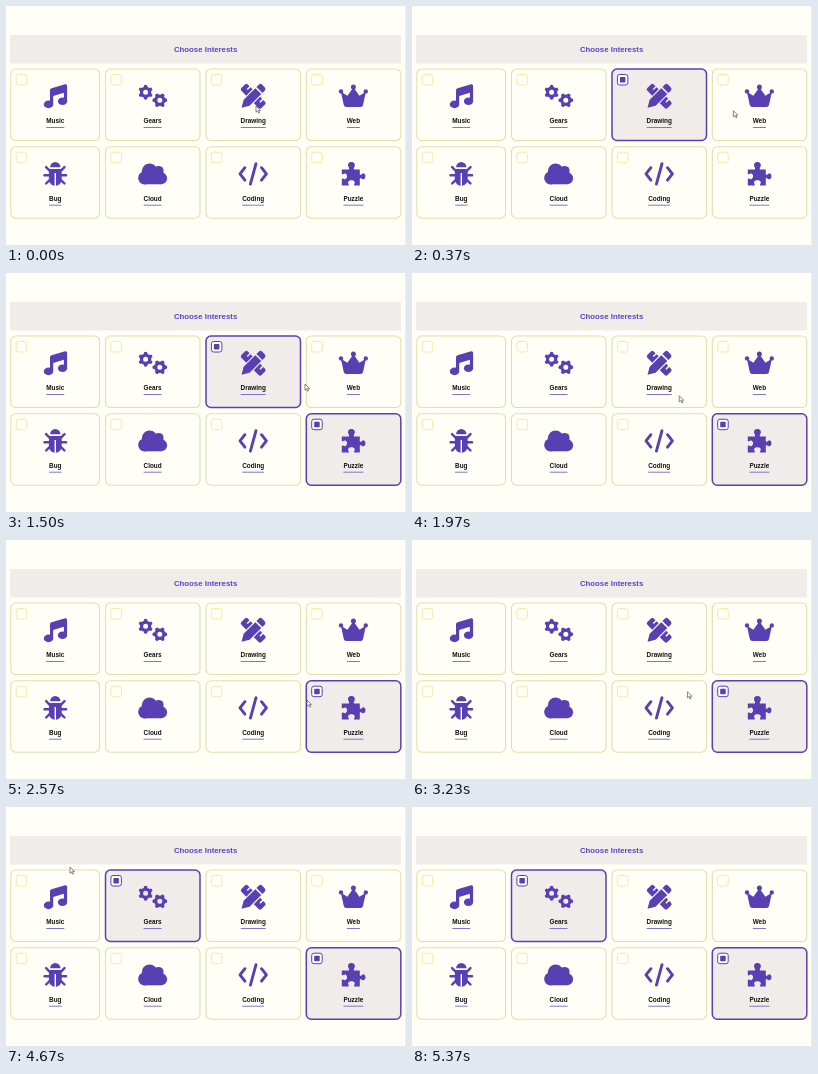
These frames come from a looping animation (400 px wide and 239 px high, 5400 ms). An HTML page:

```html
<!DOCTYPE html>
<html lang="en">
<head>
<meta charset="utf-8">
<title>Choose Interests</title>
<style>
  html, body { margin: 0; width: 100%; height: 100%; overflow: hidden; background: #fffff8; }
  svg { display: block; width: 100vw; height: 100vh; }
  text { font-family: "Liberation Sans", Arial, sans-serif; font-weight: bold; text-anchor: middle; }
  .icon { fill: #5840b4; stroke: none; }
  .line { fill: none; stroke: #5840b4; stroke-linecap: round; stroke-linejoin: round; }
</style>
</head>
<body>
<svg id="stage" viewBox="0 0 400 239">
  <rect width="400" height="239" fill="#fffff8"/>
  <rect x="399" width="1" height="239" fill="#f0eeec"/>
  <rect x="4" y="29" width="391" height="28.5" fill="#f0ecea"/>
  <text x="199.6" y="46" font-size="7.8" fill="#5b43c4">Choose Interests</text>
  <g id="cards"></g>
  <path id="cursor" d="M0 0V6.2L1.5 4.9 2.6 7.2 3.6 6.7 2.6 4.5H4.5Z" fill="#fff" stroke="#555" stroke-width=".7"/>
</svg>
<script>
const LOOP = 5400;
const FADE = 120;
const PURPLE = [88, 64, 180];
const CARD = { border: [226, 223, 172], check: [240, 237, 160], off: [255, 255, 248], on: [240, 236, 234] };

const shape = d => `<path class="icon" d="${d}"/>`;
const line = (d, width) => `<path class="line" stroke-width="${width}" d="${d}"/>`;
const ellipse = (x, y, rx, ry = rx) => `<ellipse class="icon" cx="${x}" cy="${y}" rx="${rx}" ry="${ry}"/>`;
const spin = (angle, body) => `<g transform="rotate(${angle})">${body}</g>`;

function gear(x, y, phase) {
  const teeth = [0, 1, 2, 3, 4, 5].map(i =>
    spin(phase + i * 60, shape("M4 -2.1L7 -1.5Q7.9 0 7 1.5L4 2.1Z"))).join("");
  return `<g transform="translate(${x} ${y})">
    <circle class="line" r="4.1" stroke-width="3.2"/>${teeth}</g>`;
}

const rulerHalf = shape("M-4.5 -5.3V-12.2Q-4.5 -14.2 -2.5 -14.2H2.5Q4.5 -14.2 4.5 -12.2V-9.7H.5V-8.2H4.5V-5.3Z");

const icons = {
  Music: shape("M-5.3 8V-6Q-5.3 -7.5 -3.8 -8L9.8 -12Q11.8 -12.3 11.8 -10.3V5H8.6V-3.4L-2.1 -.3V8Z")
    + ellipse(-6.8, 8.2, 4.7, 3.8) + ellipse(7.2, 5, 4.6, 3.8),
  Gears: gear(-7, -4, 30) + gear(7.2, 4, 0),
  Drawing: spin(-45, shape("M-16.5 0L-9.3 -4.2H7.2V4.2H-9.3ZM8.8 -4.2H12Q14.5 -4.2 14.5 -1.7V1.7Q14.5 4.2 12 4.2H8.8Z")
    + rulerHalf + `<g transform="scale(1 -1)">${rulerHalf}</g>`),
  Web: shape("M-12.5 -4.5L-6 -.5 0 -9 6 -.5 12.5 -4.5 9.7 8.6Q9.2 10.8 7.2 10.8H-7.2Q-9.2 10.8 -9.7 8.6Z")
    + ellipse(-12.4, -4.8, 2.2) + ellipse(0, -9.2, 2.5) + ellipse(12.4, -4.8, 2.2),
  Bug: shape("M-5.2 -6.6A5.2 5.2 0 0 1 5.2 -6.6ZM-6.4 -5H6.4V5.2C6.4 9 4 11.5 .7 11.8V-1H-.7V11.8C-4 11.5 -6.4 9 -6.4 5.2Z")
    + line("M-6 1.4H-10.8M6 1.4H10.8M-6 -3.6L-9.2 -6.8M6 -3.6L9.2 -6.8M-6 6.4L-9.2 9.6M6 6.4L9.2 9.6", 2.4),
  Cloud: ellipse(-8, 4, 6.5) + ellipse(8.5, 4.4, 6) + ellipse(-3, -2.7, 7.8) + ellipse(6, -3, 5)
    + shape("M-8 10.4H8.5V0H-8Z"),
  Coding: line("M-8.3 -6.2L-13.2 0 -8.3 6.2M8.3 -6.2L13.2 0 8.3 6.2M2.8 -10.2L-2.8 10.2", 2.9),
  Puzzle: shape(`M-11.6 -4.5H-5.3C-3.4 -4.5 -4.6 -6.5 -5.3 -8C-6.4 -13.3 2.4 -13.3 1.4 -8
    C.7 -6.5 -.5 -4.5 1.4 -4.5H6.4V.3C6.4 2 8 .2 9.4 -.5C13 -1 13 6 9.4 5.4C8 4.8 6.4 3 6.4 5V11.6
    H1.4C-.5 11.6 1.6 9.6 1.4 8.3C.8 5.8 -4.8 5.8 -5.3 8.3C-5.5 9.6 -3.4 11.6 -5.3 11.6H-11.6V5.4
    C-11.6 3.6 -9.8 5.5 -8.4 5.3C-5.6 4.6 -5.6 .1 -8.4 -.4C-9.8 -.6 -11.6 1.6 -11.6 -.2Z`)
};

// Times at which each card is toggled.
const clicks = { Drawing: [90, 1790], Web: [500, 1290], Puzzle: [1050], Gears: [4330] };

// Pointer path: time, x, y.
const path = [
  [0, 250, 100], [120, 251, 101], [500, 347, 106], [830, 333, 149], [1050, 343, 168],
  [1290, 341, 116], [1500, 299, 111], [1790, 250, 107], [2280, 306, 158], [2570, 301, 160],
  [2900, 279, 153], [3900, 265, 148], [4260, 152, 104], [4400, 148, 100], [4670, 64, 60], [5000, 37, -10]
];

const columns = [[4.8, 88.7], [99.5, 94.5], [200, 94.5], [300.3, 94.5]];
const centers = [49.3, 146.6, 247.2, 347.4];
const textWidths = { Music: 18, Gears: 18, Drawing: 25, Web: 13, Bug: 12.5, Cloud: 18, Coding: 22, Puzzle: 20 };

const cards = Object.keys(icons).map((name, i) => {
  const [x, width] = columns[i % 4];
  const center = centers[i % 4];
  const y = i < 4 ? 63 : 140.7;
  const half = textWidths[name] / 2;
  const group = document.createElementNS("http://www.w3.org/2000/svg", "g");
  group.innerHTML = `
    <rect class="frame" x="${x}" y="${y}" width="${width}" height="71.5" rx="5"/>
    <rect class="box" x="${x + 5.4}" y="${y + 5.5}" width="10.5" height="10.5" rx="2.2" fill="#fffffa"/>
    <rect class="mark" x="${x + 7.9}" y="${y + 8}" width="5.5" height="5.5" rx=".8" fill="#5840b4"/>
    <g transform="translate(${center} ${y + 27.2})">${icons[name]}</g>
    <text x="${center}" y="${y + 54.1}" font-size="6.4" fill="#111">${name}</text>
    <path d="M${center - half} ${y + 58.5}h${half * 2}" stroke="#8674c8"/>`;
  document.getElementById("cards").append(group);
  const [frame, box, mark] = ["frame", "box", "mark"].map(part => group.querySelector("." + part));
  return { frame, box, mark, times: clicks[name] || [] };
});

const cursor = document.getElementById("cursor");
const clamp = v => Math.max(0, Math.min(1, v));
const mix = (a, b, k) => a + (b - a) * k;
const ease = k => k * k * (3 - 2 * k);
const blend = (a, b, k) => `rgb(${a.map((v, i) => Math.round(mix(v, b[i], k)))})`;

function selection(times, t) {
  return times.reduce((sum, at, i) => sum + (i % 2 ? -1 : 1) * ease(clamp((t - at) / FADE)), 0);
}

function pointerAt(t) {
  const next = path.findIndex(p => p[0] > t);
  if (next < 0) return path[path.length - 1].slice(1);
  const [a, b] = [path[next - 1], path[next]];
  const k = ease((t - a[0]) / (b[0] - a[0]));
  return [mix(a[1], b[1], k), mix(a[2], b[2], k)];
}

function render(t) {
  for (const { frame, box, mark, times } of cards) {
    const on = selection(times, t);
    frame.setAttribute("fill", blend(CARD.off, CARD.on, on));
    frame.setAttribute("stroke", blend(CARD.border, PURPLE, on));
    frame.setAttribute("stroke-width", mix(1.1, 1.5, on));
    box.setAttribute("stroke", blend(CARD.check, PURPLE, on));
    mark.setAttribute("opacity", on);
  }
  cursor.setAttribute("transform", `translate(${pointerAt(t)})`);
}

const start = performance.now();
function tick() {
  render((performance.now() - start) % LOOP);
  requestAnimationFrame(tick);
}
render(0);
requestAnimationFrame(tick);
</script>
</body>
</html>
```
